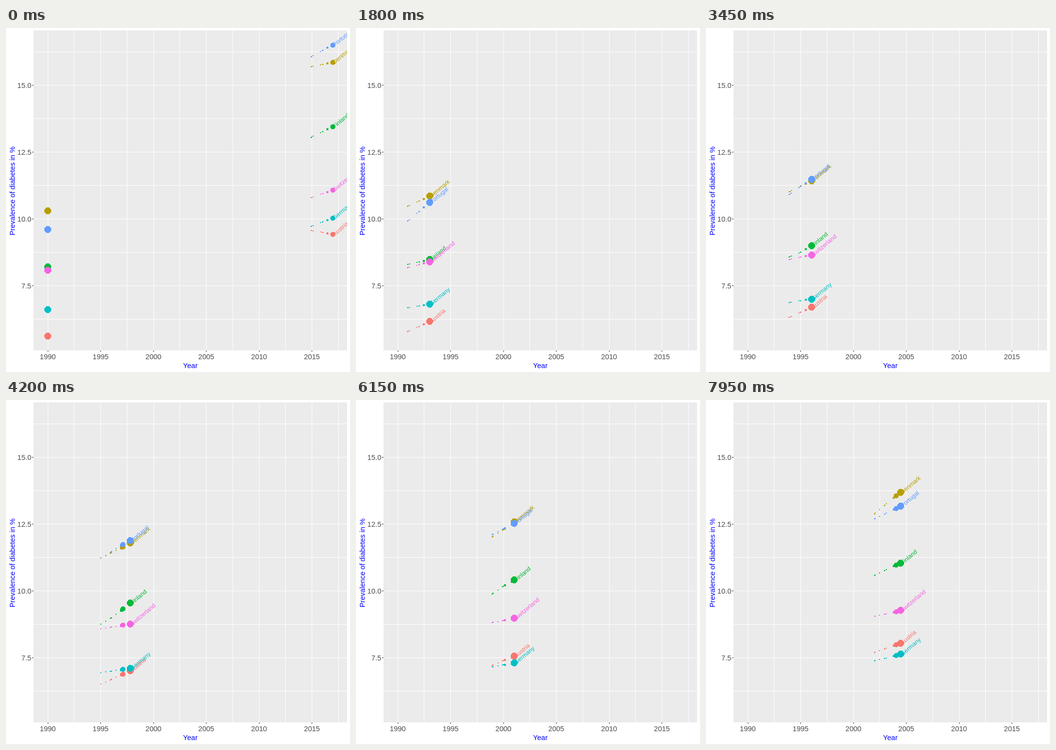
These frames come from a looping animation (700x700 px, 8 s). An HTML page:

```html
<!DOCTYPE html>
<html lang="en">
<head>
<meta charset="utf-8">
<title>Prevalence of diabetes</title>
<style>
  html, body { margin: 0; width: 100%; height: 100%; overflow: hidden; background: #fff; }
  svg { display: block; width: 100vw; height: 100vh; }
  text { font-family: "Liberation Sans", Arial, sans-serif; font-size: 14.6px; }
  .tick { fill: #4d4d4d; }
  .title { fill: #00f; text-anchor: middle; }
  .label { font-size: 12.2px; }
  rect, circle { shape-rendering: crispEdges; }
</style>
</head>
<body>
<svg viewBox="0 0 700 700">
  <defs><clipPath id="panel"><rect x="56" y="5" width="638" height="651"/></clipPath></defs>
  <rect width="700" height="700" fill="#fff"/>
  <rect x="56" y="5" width="638" height="651" fill="#ebebeb"/>
  <g id="grid"></g>
  <text class="title" x="375" y="692">Year</text>
  <text class="title" transform="translate(18 331.5) rotate(-90)">Prevalence of diabetes in %</text>
  <g clip-path="url(#panel)"><g id="labels"></g><g id="dots"></g></g>
</svg>
<script>
const STEP = 150, LOOP = 8000, FRAMES = 100, WAKE = 9, LAST = 27;

// Percentages at a few years after 1990; a smooth curve fills the rest
const KEYS = [0, 5, 10, 15, 25, 27];
const series = [
  { name: "Austria", color: "#f8766d", pct: [5.63, 6.51, 7.40, 8.13, 9.57, 9.43] },
  { name: "Denmark", color: "#b79f00", pct: [10.31, 11.23, 12.29, 13.84, 15.71, 15.86] },
  { name: "Finland", color: "#00ba38", pct: [8.22, 8.76, 10.18, 11.14, 13.07, 13.46] },
  { name: "Germany", color: "#00bfc4", pct: [6.62, 6.95, 7.24, 7.70, 9.74, 10.04] },
  { name: "Portugal", color: "#619cff", pct: [9.61, 11.22, 12.33, 13.29, 16.09, 16.51] },
  { name: "Switzerland", color: "#f564e3", pct: [8.09, 8.58, 8.90, 9.33, 10.81, 11.09] }
];

const byId = id => document.getElementById(id);
const xOf = year => 85 + year * 21.5;
const yOf = pct => 389.5 - (pct - 10) * 54.4;

function set(el, attrs) {
  for (const key in attrs) el.setAttribute(key, attrs[key]);
}

function add(parent, tag, attrs, text) {
  const el = document.createElementNS("http://www.w3.org/2000/svg", tag);
  set(el, attrs);
  if (text) el.textContent = text;
  parent.appendChild(el);
  return el;
}

function drawGrid() {
  const grid = byId("grid");
  const box = (x, y, width, height, fill) => add(grid, "rect", { x, y, width, height, fill });
  for (let year = 0; year <= 27.5; year += 2.5) box(Math.floor(xOf(year)), 5, 1, 651, "#fff");
  for (let i = 0; i < 9; i++) box(56, 48 + i * 68, 638, 1, "#fff");
  for (let year = 0; year < LAST; year += 5) {
    const x = xOf(year);
    box(Math.floor(x), 656, 1, 3, "#333");
    add(grid, "text", { class: "tick", x, y: 674, "text-anchor": "middle" }, String(1990 + year));
  }
  for (let i = 0; i < 4; i++) {
    const y = 116 + i * 136;
    box(53, y, 3, 1, "#333");
    add(grid, "text", { class: "tick", x: 51.5, y: y + 6, "text-anchor": "end" }, (15 - i * 2.5).toFixed(1));
  }
}

function slope(pct, i) {
  const span = k => KEYS[k + 1] - KEYS[k];
  const rise = k => (pct[k + 1] - pct[k]) / span(k);
  if (i === 0) return rise(0);
  if (i === KEYS.length - 1) return rise(i - 1);
  return (rise(i - 1) * span(i) + rise(i) * span(i - 1)) / (span(i - 1) + span(i));
}

// Cubic Hermite curve through the key years
function pctAt(pct, year) {
  let i = 0;
  while (i < KEYS.length - 2 && KEYS[i + 1] <= year) i++;
  const h = KEYS[i + 1] - KEYS[i], t = (year - KEYS[i]) / h, u = 1 - t;
  return u * u * (1 + 2 * t) * pct[i] + t * t * (3 - 2 * t) * pct[i + 1]
    + h * t * u * (u * slope(pct, i) - t * slope(pct, i + 1));
}

// Frame on which a whole year is reached; between years the motion eases
const keyFrame = year => Math.round(year * (FRAMES - 1) / LAST);
const cubicInOut = p => p < 0.5 ? 4 * p ** 3 : 1 - 4 * (1 - p) ** 3;

function place(s, frame) {
  let year = 0;
  while (year < LAST - 1 && keyFrame(year + 1) <= frame) year++;
  const start = keyFrame(year);
  const p = cubicInOut((frame - start) / (keyFrame(year + 1) - start));
  const from = pctAt(s.pct, year), to = pctAt(s.pct, year + 1);
  return { x: xOf(year + p), y: yOf(from + (to - from) * p) };
}

drawGrid();
const labels = series.map(s => add(byId("labels"), "text", { class: "label", fill: s.color }, s.name));
const dots = [];
for (let age = WAKE; age >= 0; age--) {
  const r = Math.max(1, 7 * (1 - age / (WAKE + 0.5)) ** 3);
  for (const s of series) dots.push({ s, age, el: add(byId("dots"), "circle", { r, fill: s.color }) });
}

function draw(frame) {
  for (const { s, age, el } of dots) {
    const { x, y } = place(s, (frame - age + FRAMES) % FRAMES);
    set(el, { cx: Math.floor(x), cy: Math.floor(y) });
  }
  // Names stay at the end of the lines while the wake still wraps around
  const named = frame < WAKE ? FRAMES - 1 : frame;
  series.forEach((s, i) => {
    const { x, y } = place(s, named);
    set(labels[i], { transform: `translate(${x + 3} ${y + 3.4}) rotate(-40)` });
  });
}

let shown = -1;
function tick() {
  const frame = Math.floor(performance.now() % LOOP / STEP);
  if (frame !== shown) draw(shown = frame);
  requestAnimationFrame(tick);
}
tick();
</script>
</body>
</html>
```
